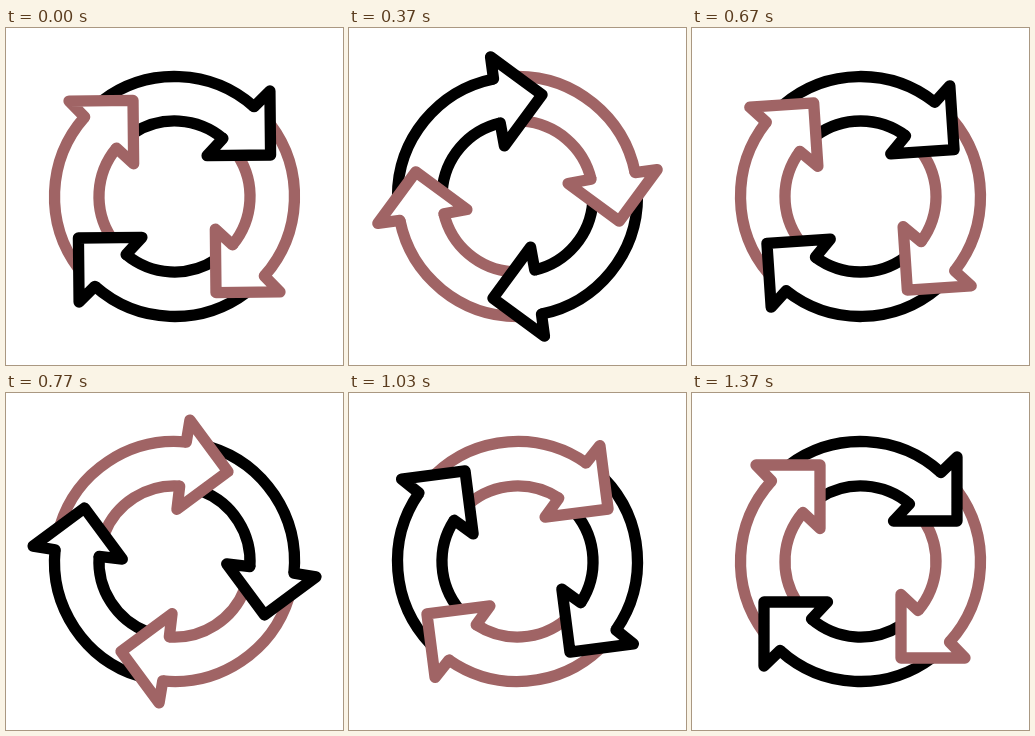
Write an HTML page that moves like this. It is 337 px wide and 337 px high and loops after 1670 ms.

```html
<!DOCTYPE html>
<html lang="en">
<head>
<meta charset="utf-8">
<title>Turning arrows</title>
<style>
  html, body { margin: 0; width: 100%; height: 100%; overflow: hidden; background: #fff; }
  svg { display: block; width: 100vw; height: 100vh; }
  .line { fill: none; stroke-width: 11.3; stroke-linejoin: round; }
  .head { stroke-linecap: round; }
  .dark { stroke: #000; }
  .rose { stroke: #a06465; }
</style>
</head>
<body>
<svg viewBox="0 0 337 337">
  <defs>
    <path id="tail" d="M-71.3 -96.5A120 120 0 0 1 80.5 -89M-40.5 -63.7A75.5 75.5 0 0 1 49 -57.5"/>
    <path id="head" d="M80.5 -89L96.5 -104.5V-40.5H33L49 -57.5"/>
  </defs>
  <g id="ring"></g>
</svg>
<script>
const LOOP = 1670, STEP = 100 / 3, LAST = 42;
const ring = document.getElementById('ring');

// Tails lie below every head.
for (const part of ['tail', 'head']) {
  for (let i = 0; i < 4; i++) {
    const use = document.createElementNS('http://www.w3.org/2000/svg', 'use');
    use.setAttribute('href', '#' + part);
    use.setAttribute('class', `line ${part} ${i % 2 ? 'rose' : 'dark'}`);
    use.setAttribute('transform', `rotate(${i * 90})`);
    ring.append(use);
  }
}

// Symmetric ease from 0 to 1 with flat ends; h is the handle length.
function ease(x, h) {
  let lo = 0, hi = 1;
  for (let i = 0; i < 30; i++) {
    const u = (lo + hi) / 2, v = 1 - u;
    if (3 * u * v * v * h + 3 * u * u * v * (1 - h) + u * u * u < x) lo = u;
    else hi = u;
  }
  return lo * lo * (3 - 2 * lo);
}

// Keys: step, angle, handle of the ease leading to it.
const keys = [
  [0, 0],
  [13.5, -55, 0.42],
  [LAST, 360, 0.485]
];

function angleAt(step) {
  const n = step <= keys[1][0] ? 1 : 2;
  const [s0, a0] = keys[n - 1], [s1, a1, h] = keys[n];
  return a0 + (a1 - a0) * ease((step - s0) / (s1 - s0), h);
}

// The picture advances 30 times a second, on 10 ms ticks.
function draw(time) {
  const tick = Math.floor((time % LOOP) / 10) * 10;
  const step = Math.min(LAST, Math.floor((tick + 5) / STEP) + 1);
  ring.setAttribute('transform', `translate(168.5 168.5) rotate(${angleAt(step).toFixed(2)})`);
}

const start = performance.now();
function frame() {
  draw(performance.now() - start);
  requestAnimationFrame(frame);
}
frame();
</script>
</body>
</html>
```
